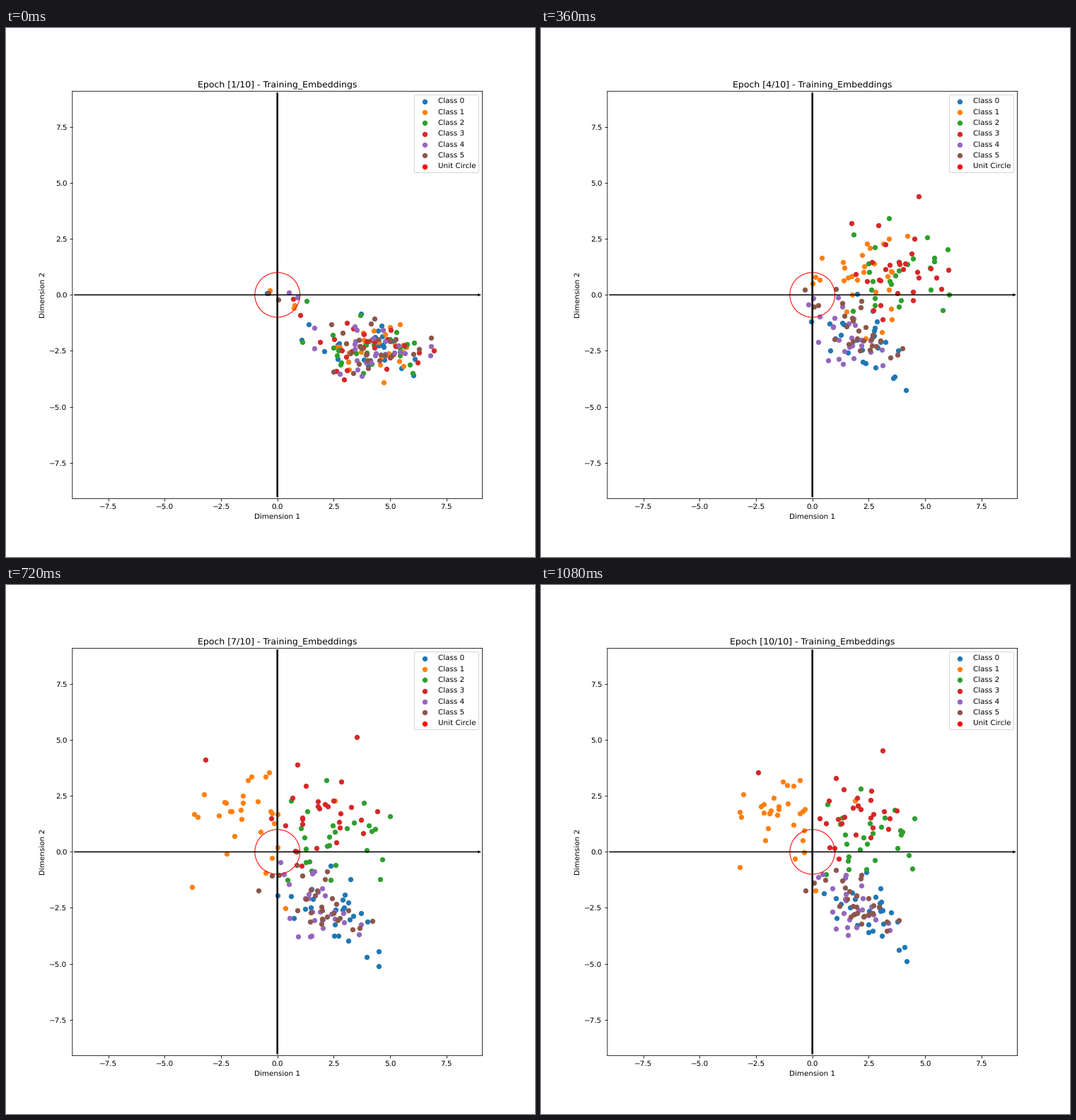
Write a matplotlib script that moves like this. It is 748x748 px and loops after 1.2 s.

```python
import numpy as np
import matplotlib.pyplot as plt
from matplotlib.animation import FuncAnimation
from matplotlib.patches import Circle

EPOCHS = 10
POINTS = 27  # per class, without strays
SPLIT, SETTLED = 3, 7  # epochs where the classes part and come to rest
WOBBLE = 0.1

# Colour, centre when parting, centre at rest, spread in x and y, correlation
CLASSES = [
    ("tab:blue", (2.3, -1.95), (2.6, -2.75), (0.95, 0.9), -0.55),
    ("tab:orange", (3.0, 0.6), (-1.4, 1.7), (0.85, 0.95), -0.2),
    ("tab:green", (4.1, 1.0), (2.6, 0.6), (1.1, 0.95), 0.1),
    ("tab:red", (4.1, 0.85), (1.85, 1.65), (0.95, 0.85), 0.0),
    ("tab:purple", (1.4, -1.65), (1.8, -2.45), (0.75, 0.8), -0.5),
    ("tab:brown", (2.1, -1.45), (2.0, -2.25), (0.8, 0.75), -0.7),
]

# Points far from their class: where they part and where they rest
STRAYS = {
    "tab:orange": [[(1.0, 0.8), (-3.35, -0.8)],
                   [(2.9, -1.55), (0.0, -1.7)],
                   [(4.45, 2.7), (1.9, 2.2)]],
    "tab:red": [[(5.0, 3.8), (3.1, 4.6)], [(2.6, 2.9), (-2.4, 3.7)]],
    "tab:brown": [[(0.05, 0.2), (-0.4, -1.85)]],
}

rng = np.random.default_rng(7)


def smooth(t):
    t = np.clip(t, 0, 1)
    return t * t * (3 - 2 * t)


def bump(t):
    """Rise and fall over 0..1, zero outside."""
    return np.sin(np.pi * np.clip(t, 0, 1))


def unit_cloud(n):
    """Centred normal points, far ones pulled in."""
    z = rng.standard_normal((n, 2))
    z = (z - z.mean(axis=0)) / z.std(axis=0)
    r = np.linalg.norm(z, axis=1, keepdims=True)
    return z * np.minimum(1, 2.3 / r)


def first_blob(z):
    """Shared blob with a thin tail that bends to the centre."""
    x = 4.0 + 1.3 * z[:, 0] + 1.2 * np.minimum(z[:, 0] + 1, 0)
    y = -2.45 + 0.6 * z[:, 1] + np.maximum(2.4 - x, 0)
    return np.column_stack([x, y])


class Cluster:
    def __init__(self, color, part, rest, spread, tilt):
        strays = np.array(STRAYS.get(color, [])).reshape(-1, 2, 2)
        z = unit_cloud(POINTS + len(strays))
        skewed = tilt * z[:, 0] + np.sqrt(1 - tilt**2) * z[:, 1]
        offset = np.column_stack([z[:, 0], skewed]) * spread
        self.centers = np.array([part, rest])
        self.first = first_blob(z)
        self.offsets = np.array([offset, offset])
        self.offsets[:, :len(strays)] = strays.transpose(1, 0, 2) - self.centers[:, None]
        self.noise = WOBBLE * rng.standard_normal((EPOCHS, len(z), 2))

    def at(self, epoch):
        t = smooth((epoch - SPLIT) / (SETTLED - SPLIT))
        swell = 1 + 0.25 * bump((epoch - SPLIT) / 6)
        center = (1 - t) * self.centers[0] + t * self.centers[1]
        offset = (1 - t) * self.offsets[0] + t * self.offsets[1]
        xy = center + swell * offset

        start = np.clip((epoch - 1) / (SPLIT - 1), 0, 1)
        xy = (1 - start) * self.first + start * xy
        xy[:, 0] *= 1 + 0.25 * bump(start)
        return xy + self.noise[epoch - 1]


plt.rcParams.update({"path.snap": False, "text.hinting": "none"})
fig, ax = plt.subplots(figsize=(10, 10), dpi=74.8)
fig.subplots_adjust(left=0.1255, right=0.9005, bottom=0.1105, top=0.8805)
ax.set(xlim=(-9.1, 9.1), ylim=(-9.1, 9.1), xlabel="Dimension 1", ylabel="Dimension 2")

clusters = [Cluster(*spec) for spec in CLASSES]
dots = [ax.scatter(*k.at(1).T, color=spec[0], label=f"Class {i}")
        for i, (k, spec) in enumerate(zip(clusters, CLASSES))]
ax.scatter([], [], color="red", label="Unit Circle")
ax.add_patch(Circle((0, 0), 1, color="red", fill=False))
ax.plot([-9, 9], [0, 0], color="black", lw=1.5)
ax.plot([0, 0], [-9, 9], color="black", lw=2.5)
ax.fill([8.9, 9.03, 8.9], [0.07, 0, -0.07], color="black", lw=0, zorder=2)
ax.legend(loc="upper right", labelspacing=0.545)
title = ax.set_title("")


def update(frame):
    epoch = frame + 1
    for dot, cluster in zip(dots, clusters):
        dot.set_offsets(cluster.at(epoch))
    title.set_text(f"Epoch [{epoch}/{EPOCHS}] - Training_Embeddings")
    return [*dots, title]


anim = FuncAnimation(fig, update, frames=EPOCHS, interval=120, repeat=True, repeat_delay=0)
plt.show()
```
